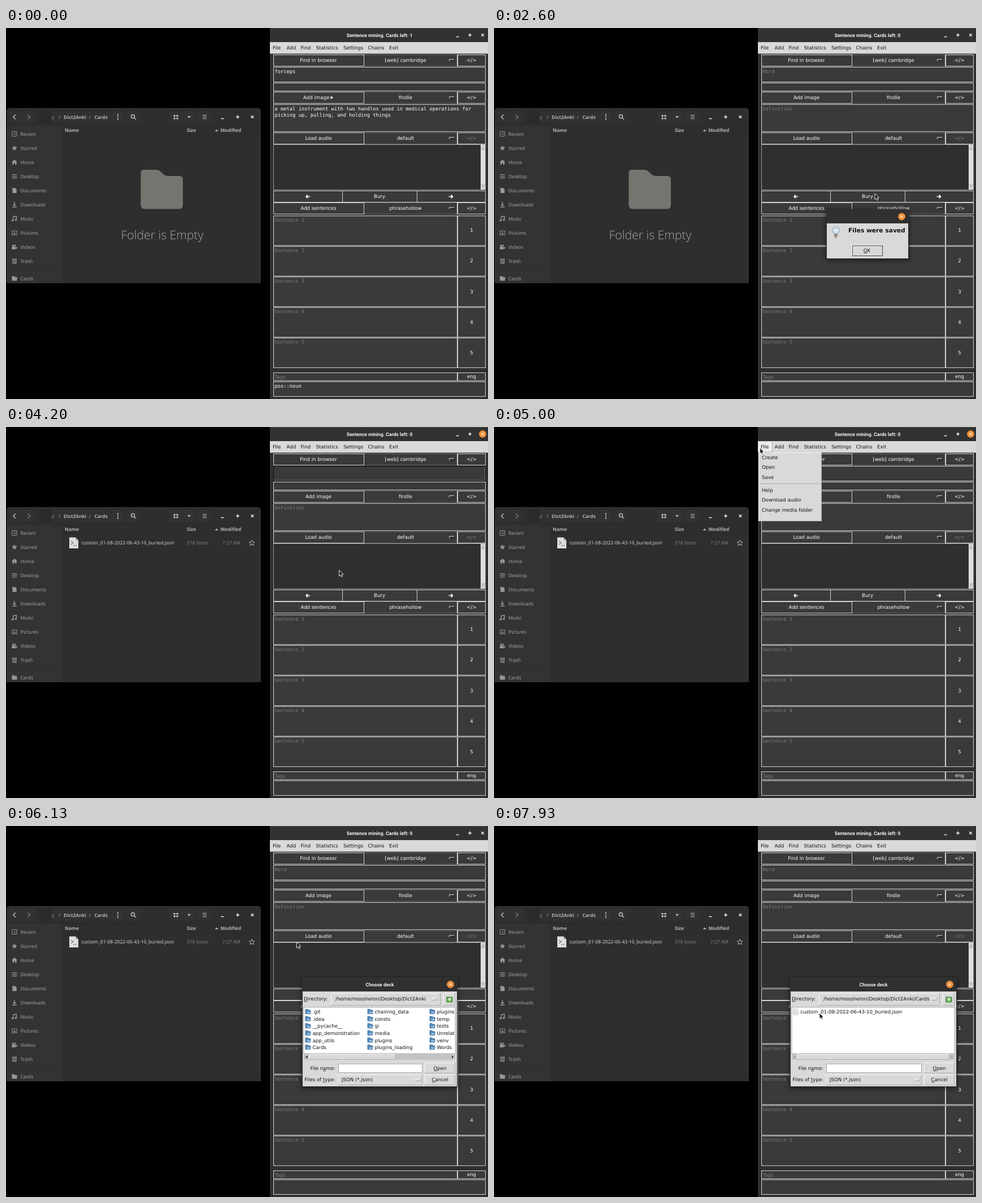
Write an HTML page that moves like this. It is 853 by 657 pixels and loops after 8 s.

```html
<!DOCTYPE html>
<html lang="en">
<head>
<meta charset="utf-8">
<title>Sentence mining</title>
<style>
html, body { margin: 0; width: 100%; height: 100%; overflow: hidden; background: #000; }
svg { display: block; width: 100%; height: 100%; }
text { font: 8.6px "DejaVu Sans", sans-serif; fill: #fff; white-space: pre; text-rendering: geometricPrecision; }
.dark { fill: #111; }
.dim { fill: #7c7c7c; }
.mono { font: 8.76px "DejaVu Sans Mono", monospace; }
.title { font: 700 8.6px Roboto, sans-serif; fill: #f2f2f2; }
.alert { font: 700 10.7px "DejaVu Sans", sans-serif; fill: #111; }
.ui { font: 8.5px "Noto Sans", sans-serif; fill: #a5a5a5; }
.ui.bold { font-weight: 600; font-size: 8.3px; fill: #b4b4b4; }
.ui.file { fill: #d0d0d0; }
.ui.faint { fill: #7e7e7e; }
.empty { font: 300 21.2px "Open Sans", "Noto Sans", sans-serif; fill: #a6a6a6; }
.pop { filter: drop-shadow(0 2px 4px rgba(0, 0, 0, .6)); }
</style>
</head>
<body>
<svg id="stage" viewBox="0 0 853 657"></svg>
<script>
const LOOP = 8000;
const stage = document.getElementById('stage');

const rect = (x, y, w, h, fill, extra = '') =>
  `<rect x="${x}" y="${y}" width="${w}" height="${h}" fill="${fill}" ${extra}/>`;
const path = (d, stroke, width = 1, fill = 'none') =>
  `<path d="${d}" stroke="${stroke}" stroke-width="${width}" fill="${fill}"/>`;
const text = (x, y, s, cls = '', anchor = 'start') =>
  `<text x="${x}" y="${y}" class="${cls}" text-anchor="${anchor}">${s.replace(/</g, '&lt;')}</text>`;
const mid = (x, y, s, cls) => text(x, y + 3.1, s, cls, 'middle');
const group = (id, body, extra = '') => `<g id="${id}" ${extra}>${body}</g>`;
const frame = (x, y, w, h, fill = '#3a3a3a', edge = '#d4d4d4') =>
  rect(x + .5, y + .5, w - 1, h - 1, fill, `stroke="${edge}"`);
const bevel = (x, y, w, h, fill = '#d9d9d9') =>
  rect(x, y, w, h, fill) +
  path(`M${x + .5} ${y + h - .5}V${y + .5}H${x + w}`, '#f6f6f6') +
  path(`M${x} ${y + h - .5}H${x + w - .5}V${y}`, '#aaa');
const cross = (x, y, color) =>
  path(`M${x - 2.3} ${y - 2.3}l4.6 4.6m0 -4.6l-4.6 4.6`, color, 1.4);
const closeDot = (x, y) =>
  `<circle cx="${x}" cy="${y}" r="6.5" fill="#f08e35"/>` + cross(x, y, '#fbe0c8');

// File manager

function sidebar() {
  const c = '#989898';
  const dot = (x, y, r) => `<circle cx="${x}" cy="${y}" r="${r}" fill="${c}"/>`;
  const icons = {
    Recent: path('M-4 -4H4V4H-4ZM0 -2V1H2', c),
    Starred: path('M0 -5L1.4 -1.6L5 -1.4L2.2 .9L3.1 4.5L0 2.5L-3.1 4.5L-2.2 .9L-5 -1.4L-1.4 -1.6Z', 'none', 0, c),
    Home: path('M-5 0L0 -4.5L5 0H3.6V4.5H1V1.5H-1V4.5H-3.6V0Z', 'none', 0, c),
    Desktop: path('M-4.5 -3H4.5M-4.5 0H4.5M-4.5 3H4.5', c, 1.4),
    Documents: path('M-3.6 -4.5H1L3.8 -1.6V4.5H-3.6Z', 'none', 0, c),
    Downloads: path('M0 -5V2M-2.6 -.6L0 2L2.6 -.6M-4 4.2H4', c, 1.4),
    Music: path('M-2.2 3V-3.6L3.4 -4.4V2', c, 1.4) + dot(-3.2, 3, 1.8) + dot(2.4, 2.2, 1.8),
    Pictures: path('M-4.5 -3.5H4.5V3.5H-4.5ZM-2 1.5L0 -1L2 1.5Z', c),
    Videos: path('M-4.5 -1H2V4H-4.5ZM2.4 1L5 -.6V3.6L2.4 2Z', 'none', 0, c) + dot(-2.6, -2.8, 1.7) + dot(1, -2.8, 1.7),
    Trash: path('M-4.5 -3.5H4.5M-3.3 -1.5L-2.6 4H2.6L3.3 -1.5ZM-1 0V2.5M1 0V2.5', c, 1.2),
    Cards: path('M-4.5 -4H-1L.5 -2.5H4.5V4H-4.5Z', 'none', 0, c)
  };
  return Object.entries(icons).map(([name, icon], i) => {
    const y = i < 10 ? 187.5 + 25.05 * i : 443.5;
    return `<g transform="translate(15 ${y})">${icon}</g>` + text(25.5, y + 3.2, name, 'ui');
  }).join('');
}

function fileManager() {
  const c = '#bdbdbd';
  const tools = [[5, 23], [28, 23], [187, 22], [214, 23], [289, 23], [312, 23], [340, 23]]
    .map(([x, w]) => rect(x, 147, w, 21, '#323232', 'rx="2"')).join('');
  return path('M1 452V147Q1 142 6 142H446Q451 142 451 147V452Z', 'none', 0, '#2e2e2e') +
    rect(1, 172, 98, 280, '#333') + rect(1, 172, 450, 1, '#292929') + rect(6, 142, 440, 1, '#3b3b3b') +
    tools + rect(57, 147, 129, 21, '#313131', 'rx="2"') + rect(58, 146, 24, 22, '#2a2a2a') +
    path('M17 153.5L13 157.5L17 161.5', c, 1.5) + path('M38.5 153.5L42.5 157.5L38.5 161.5', '#777', 1.5) +
    text(80.5, 160.5, 'p', 'ui faint') + text(93.5, 160.5, '/', 'ui') + text(102, 160.5, 'Dict2Anki', 'ui bold') +
    text(147, 160.5, '/', 'ui') + text(156.5, 160.5, 'Cards', 'ui bold') +
    path('M198 152.5v2.2m0 1.7v2.2m0 1.7v2.2', c, 2.2) +
    `<circle cx="224.5" cy="156.5" r="3" fill="none" stroke="${c}" stroke-width="1.4"/>` + path('M227 159L230 162', c, 1.6) +
    path('M296.5 155.5h3.3m1.6 0h3.3m-8.2 4.5h3.3m1.6 0h3.3', c, 2.8) +
    path('M321 156H327L324 159.5Z', 'none', 0, c) + path('M348 154.5h7m-7 3h7m-7 3h7', c, 1.2) +
    path('M380.5 160.5h5', '#eee', 1.5) + path('M407 157.5h6m-3 -3v6', '#eee', 1.5) + cross(436, 157.5, '#eee') +
    text(104, 184, 'Name', 'ui bold') + text(320, 184, 'Size', 'ui bold') + text(379.5, 184, 'Modified', 'ui bold') +
    path('M369.5 183H376L372.8 179.5Z', 'none', 0, '#aaa') + rect(99, 189, 352, 1, '#292929') +
    rect(1, 428, 98, 1, '#2e2e2e') + sidebar() +
    group('noFiles',
      path('M238.5 257Q238.5 251 244.5 251H266Q270 251 273 254L280 260Q282 262 286 262H306Q313 262 313 269V313Q313 320.5 306 320.5H246Q238.5 320.5 238.5 313Z', 'none', 0, '#757570') +
      text(276.5, 374, 'Folder is Empty', 'empty', 'middle')) +
    group('fileRow',
      path('M112 195.5H123L128 200.5V215H112Z', 'none', 0, '#dedede') + path('M123 195.5V200.5H128Z', 'none', 0, '#aaa') +
      path('M115 202L119 205L115 208M119.5 210H125', '#777', 1.1) +
      text(133.5, 207.8, 'custom_01-08-2022-06-43-10_buried.json', 'ui file') +
      text(358, 207.8, '378 bytes', 'ui faint', 'end') + text(415, 207.8, '7:27 AM', 'ui faint', 'end') +
      path('M435 200.5L436.4 203.6L440 204L437.3 206.2L438.2 209.7L435 207.8L431.8 209.7L432.7 206.2L430 204L433.6 203.6Z', '#c4c4c4', .9));
}

// Card editor

const notch = (x, y) => path(`M${x + .5} ${y + 4}V${y + .5}H${x + 9}`, '#ccc') + path(`M${x + 1} ${y + 4.5}H${x + 9.5}V${y + 1}`, '#222');

function toolRow(y, label, choice, codeClass = '') {
  return frame(633, y, 166, 21, '#3a3a3a', '#666') + frame(473, y, 161, 21) + frame(799, y, 50, 21) +
    path(`M798.5 ${y}v21`, '#d4d4d4') +
    mid(553, y + 10, label) + mid(707, y + 10, choice) + mid(824, y + 10, '</>', codeClass) + notch(784, y + 8);
}

function editor() {
  const menus = { File: 472, Add: 496.5, Find: 521.5, Statistics: 548.5, Settings: 597, Chains: 640.5, Exit: 678 };
  let s = rect(467, 0, 386, 657, '#2f2f31') + rect(467, 0, 386, 25, '#323232') + rect(467, 0, 386, 1, '#444') +
    rect(467, 25, 386, 20.5, '#d9d9d9') +
    text(661, 16, 'Sentence mining. Cards left: 1', 'title', 'middle').replace('<text', '<text id="heading"') +
    path('M796.5 15.5h5', '#eee', 1.5) + path('M818 12.5h6m-3 -3v6', '#eee', 1.5) +
    group('closeOff', cross(843.5, 12.5, '#eee')) + group('closeOn', closeDot(843.5, 12.5));
  for (const name in menus) s += text(menus[name], 38, name, 'dark');

  s += toolRow(47, 'Find in browser', '[web] cambridge') + frame(473, 69, 376, 27) +
    group('wordFocus', frame(473, 69, 376, 27, '#3a3a3a', '#161616') + path('M474 94.5H847.5V70', '#6c6c6c')) +
    frame(473, 97, 376, 15) +
    toolRow(113, 'Add image', 'findle').replace('>Add image<', ' id="imageLabel">Add image<') +
    frame(473, 135, 376, 49) + toolRow(185, 'Load audio', 'default', 'dim') +
    frame(473, 206, 376, 81, '#2f2f31', '#999') + rect(840, 207, 8, 79, '#dedede') +
    path('M841.5 213.5L844 209L846.5 213.5ZM841.5 279.5L844 284L846.5 279.5Z', '#999', .8) +
    path('M840.5 215.5H848M840.5 277.5H848', '#aaa');

  s += frame(473, 288, 123, 21) + frame(595, 288, 133, 21) + frame(727, 288, 122, 21) +
    path('M538 298.5H531.5M534 295.5L531 298.5L534 301.5', '#fff', 1.7) +
    path('M783.5 298.5H790M787.5 295.5L790.5 298.5L787.5 301.5', '#fff', 1.7) +
    group('pressed', path('M597 307.5H726.5V289', '#d4d4d4')) +
    group('bury', mid(661, 298, 'Bury')) + toolRow(309, 'Add sentences', 'phrasehollow');

  for (let i = 0; i < 5; i++) {
    const y = 332.2 + 54.1 * i;
    s += frame(473, y, 326, 53.5) + frame(799, y, 50, 53.5) +
      text(475, y + 10.8, 'Sentence ' + (i + 1), 'mono dim') + mid(824, y + 26, String(i + 1));
  }
  return s + frame(473, 610, 326, 15) + text(475.5, 620.7, 'Tags', 'dim') + frame(799, 610, 50, 15) + mid(824, 617.3, 'eng') +
    frame(473, 626, 376, 27) +
    group('card', text(475.5, 80, 'forceps', 'mono') +
      text(475.5, 145.6, 'a metal instrument with two handles used in medical operations for', 'mono') +
      text(475.5, 157, 'picking up, pulling, and holding things', 'mono') + text(475.5, 637, 'pos::noun', 'mono')) +
    group('wordHint', text(475.5, 80, 'Word', 'mono dim')) +
    group('defHint', text(475.5, 145.6, 'Definition', 'mono dim')) +
    rect(512, 71, 1, 12, '#fff', 'id="caretEnd"') + rect(475, 71, 1, 12, '#fff', 'id="caretStart"');
}

function fileMenu() {
  const items = ['Create', 'Open', 'Save', 'Help', 'Download audio', 'Change media folder'];
  return group('menu', bevel(468, 27, 25, 18, '#ececec') + text(472, 38, 'File', 'dark') +
    bevel(468, 45, 112, 122) + group('menuHover', bevel(470, 62, 108, 17, '#ececec')) +
    path('M471 100.5H577', '#aaa') +
    items.map((s, i) => text(474, 57 + 17.3 * i + (i > 2 ? 6 : 0), s, 'dark')).join(''));
}

// Dialogs

function savedDialog() {
  return group('saved', rect(588, 321, 146, 88, '#303030', 'rx="3"') + rect(589, 346, 144, 62, '#d9d9d9') + closeDot(721.5, 334) +
    '<circle cx="605" cy="358.5" r="6.3" fill="#c9dcec" stroke="#8ba2b4"/>' +
    path('M601.5 357L604 360L606 357L608.5 360', '#fff', 1.2) +
    rect(602, 364, 6, 6, '#a4a08e', 'rx="1"') + path('M602 366.5h6M603 371h4', '#555') +
    text(627, 362, 'Files were saved', 'alert') + bevel(633, 384, 55, 20) +
    group('okHover', rect(635, 386, 51, 16, '#ececec')) +
    rect(634.5, 385.5, 53, 18, 'none', 'stroke="#111" stroke-dasharray="2 1"') +
    mid(660, 393.5, 'OK', 'dark') + path('M654 398.5h6.5', '#111', .8), 'class="pop"');
}

const folder = (x, y) =>
  path(`M${x} ${y - 4.5}H${x + 4}L${x + 5} ${y - 3}H${x + 8.5}V${y + 3.5}H${x}Z`, '#34618f', .8, '#5b91c4') +
  path(`M${x + 1.8} ${y + 3.5}V${y - 1}H${x + 9.5}L${x + 8.5} ${y + 3.5}Z`, '#34618f', .7, '#8ebbe4');

function chooser(id, right, dir, list, thumb) {
  const w = right - 524, r = right - 4, field = right - 62, btn = right - 31;
  const pick = (x, y) => bevel(x, y, 10, 5);
  return group(id,
    path(`M524 462V273Q524 268 529 268H${right - 5}Q${right} 268 ${right} 273V462Z`, 'none', 0, '#303030') +
    rect(525, 293, w - 2, 168, '#d9d9d9') + text(524 + w / 2, 284, 'Choose deck', 'title', 'middle') + closeDot(right - 12.5, 280.5) +
    text(527, 309, 'Directory:', 'dark') + path('M527.5 310.7h6', '#111', .8) +
    bevel(575, 296, right - 30 - 575, 22) + text(583, 309, dir, 'dark') + pick(right - 45, 304) +
    bevel(right - 25, 296, 21, 22) + folder(right - 19, 307.5) +
    path(`M${right - 19} 303H${right - 9}V312H${right - 19}Z`, '#33742c', .8, '#67b451') +
    path(`M${right - 14} 311V305M${right - 16.5} 307.5L${right - 14} 305L${right - 11.5} 307.5`, '#eff8e9', 1.4) +
    rect(527, 321, r - 527, 82, '#fff', 'stroke="#999" stroke-width=".8"') + list +
    rect(527, 404, r - 527, 10, '#c3c3c3') + bevel(536, 404, thumb - 536, 10) +
    path(`M533.5 406.5L530 409L533.5 411.5ZM${r - 6} 406.5L${r - 3} 409L${r - 6} 411.5Z`, 'none', 0, id === 'rootDir' ? '#222' : '#999') +
    text(583, 432, 'File name:', 'dark', 'end') + path('M561 433.7h5', '#111', .8) +
    rect(588.5, 421.5, field - 589, 15, '#fff', 'stroke="#aaa"') +
    text(583, 452, 'Files of type:', 'dark', 'end') + path('M560.5 453.7h3.5', '#111', .8) +
    bevel(588, 440, field - 588, 19) + text(594, 452, 'JSON (*.json)', 'dark') + pick(right - 75, 447) +
    bevel(right - 58, 419, 54, 19) + mid(btn, 428.7, 'Open', 'dark') + path(`M${btn - 11} 433.5h6`, '#111', .8) +
    bevel(right - 58, 440, 54, 19) + mid(btn, 449, 'Cancel', 'dark') + path(`M${btn - 14} 453.7h6`, '#111', .8),
    'class="pop"');
}

function rootDir() {
  const columns = [
    [530, '.git .idea __pycache__ app_demonstration app_utils Cards'],
    [640, 'chaining_data consts gi media plugins plugins_loading'],
    [750, 'plugins temp tests Unrelated venv Words']
  ];
  let list = group('selected', rect(541.5, 386, 26.5, 12, '#4a6984'));
  for (const [x, names] of columns)
    names.split(' ').forEach((s, i) => {
      const y = 329 + 12.6 * i;
      list += folder(x, y) + text(x + 12.5, y + 3.1, s, 'dark').replace('<text', s === 'Cards' ? '<text id="cardsName"' : '<text');
    });
  return chooser('rootDir', 799, '/home/mossheron/Desktop/Dict2Anki',
    `<clipPath id="listBox">${rect(527, 321, 267, 82, '#fff')}</clipPath><g clip-path="url(#listBox)">${list}</g>`, 690);
}

function cardsDir() {
  const page = path('M530 324H536L538 326V334H530Z', '#aaa', .8, '#f3f3f3') + path('M531.5 327.5h4m-4 2h5m-5 2h5', '#bbb', .7);
  return chooser('cardsDir', 819, '/home/mossheron/Desktop/Dict2Anki/Cards',
    page + text(542, 332.1, 'custom_01-08-2022-06-43-10_buried.json', 'dark'), 806);
}

const ibeam = 'M-2.5 -5.5H2.5M0 -5.5V5.5M-2.5 5.5H2.5';
stage.innerHTML = rect(0, 0, 853, 657, '#000') + fileManager() + editor() + fileMenu() + savedDialog() + rootDir() + cardsDir() +
  group('arrow', path('M0 0V10.6L2.4 8.4L4.1 12L5.9 11.2L4.3 7.7H7.4Z', '#fff', .9, '#161616')) +
  group('beam', path(ibeam, '#222', 2.4) + path(ibeam, '#fff', 1.1), 'transform="translate(485.5 70.5)"');

const el = {};
stage.querySelectorAll('[id]').forEach(n => el[n.id] = n);
const show = (id, on) => el[id].setAttribute('visibility', on ? 'visible' : 'hidden');

// Pointer moves: start, end, x, y reached
const moves = [
  [0, 800, 847, 199], [870, 1600, 674, 293], [2670, 3400, 661, 384], [3870, 4670, 469, 33],
  [4870, 5470, 483, 65], [5800, 6530, 556, 391], [7130, 7800, 575, 331], [7870, 7930, 576, 331]
];
const ease = p => p * p * (3 - 2 * p);

function pointer(t) {
  let [, , x, y] = moves[0];
  for (const [start, end, toX, toY] of moves.slice(1)) {
    const p = ease(Math.min(1, Math.max(0, (t - start) / (end - start))));
    x += (toX - x) * p;
    y += (toY - y) * p;
  }
  return [x, y];
}

function update(t) {
  const within = (a, b) => t >= a && t < b;
  const filled = t < 1940;
  const focused = within(1730, 2600) || within(3870, 5870);
  const pressed = within(1800, 1940);
  const [x, y] = pointer(t);

  el.heading.textContent = 'Sentence mining. Cards left: ' + (filled ? 1 : 0);
  el.imageLabel.textContent = filled ? 'Add image★' : 'Add image';
  show('closeOn', focused);
  show('closeOff', !focused);
  show('wordFocus', within(1730, 2600) || within(3870, 4870));
  show('card', filled);
  show('defHint', !filled);
  show('wordHint', within(2600, 3870) || t >= 4870);
  show('caretEnd', within(1730, 1940));
  show('caretStart', within(1940, 2400));
  show('pressed', pressed);
  el.bury.setAttribute('transform', pressed ? 'translate(.7 1)' : '');

  show('noFiles', t < 2670);
  show('fileRow', t >= 2670);
  show('saved', within(2600, 3870));
  show('okHover', within(3400, 3870));
  show('menu', within(4870, 5730));
  show('menuHover', within(5300, 5730));
  show('rootDir', within(5870, 7130));
  show('selected', within(7000, 7130));
  el.cardsName.style.fill = within(7000, 7130) ? '#fff' : '';
  show('cardsDir', t >= 7130);

  const beam = within(5730, 5800);
  show('beam', beam);
  show('arrow', t >= 870 && !beam);
  el.arrow.setAttribute('transform', `translate(${x.toFixed(2)} ${y.toFixed(2)})`);
}

function tick() {
  update(performance.now() % LOOP);
  requestAnimationFrame(tick);
}
tick();
</script>
</body>
</html>
```
